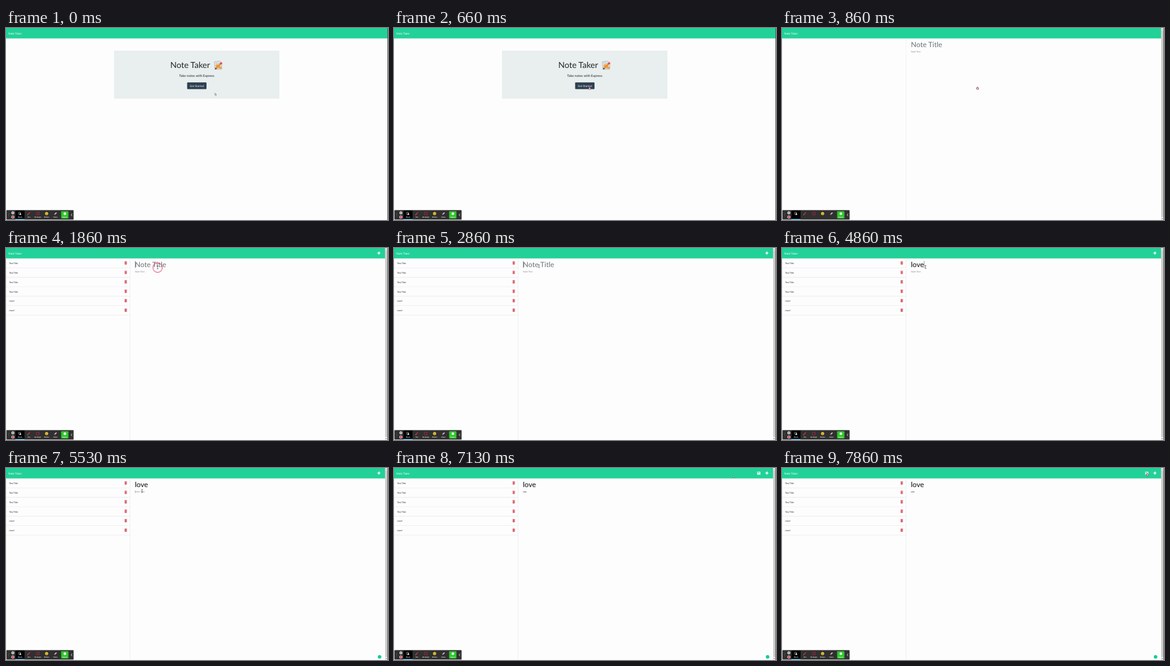
An HTML page with a canvas for the animation above (8 s loop, 640x322 px).

```html
<!DOCTYPE html>
<html lang="en">
<head>
<meta charset="utf-8">
<title>Note Taker</title>
<style>
html, body { margin: 0; width: 100%; height: 100%; overflow: hidden; background: #fdfdfe; }
canvas { display: block; width: 640px; height: 322px; }
</style>
</head>
<body>
<canvas id="stage" width="640" height="322"></canvas>
<script>
const ctx = document.getElementById('stage').getContext('2d');
const LOOP = 8000;
const STEP = 1000 / 15;
const GREEN = '#22d198';
const INK = '#212529';

// Pointer moves: start, end, from x/y, to x/y, easing
const inOut = p => p * p * (3 - 2 * p);
const out = p => 1 - Math.pow(1 - p, 3.5);
const MOVES = [
  [0, 660, 350, 109, 327, 99, inOut],
  [870, 1660, 327, 99, 254, 32.5, inOut],
  [1870, 2530, 254, 32.5, 243, 30.5, inOut],
  [4730, 5260, 243, 30.5, 228, 38.5, inOut],
  [6733, 7600, 228, 38.5, 611.5, 9, out]
];

function pointerAt(t) {
  let pos = [350, 109];
  for (const [start, end, x0, y0, x1, y1, ease] of MOVES) {
    if (t < start) break;
    const p = ease(Math.min(1, (t - start) / (end - start)));
    pos = [x0 + (x1 - x0) * p, y0 + (y1 - y0) * p];
  }
  return pos;
}

function box(x, y, w, h, fill, r = 0) {
  ctx.fillStyle = fill;
  ctx.beginPath();
  ctx.roundRect(x, y, w, h, r);
  ctx.fill();
}

function dot(x, y, r, fill) {
  ctx.fillStyle = fill;
  ctx.beginPath();
  ctx.arc(x, y, r, 0, Math.PI * 2);
  ctx.fill();
}

function ring(x, y, r, color, width) {
  ctx.strokeStyle = color;
  ctx.lineWidth = width;
  ctx.beginPath();
  ctx.arc(x, y, r, 0, Math.PI * 2);
  ctx.stroke();
}

function path(points, fill, stroke, width = 1, close = true) {
  ctx.beginPath();
  points.forEach(([x, y], i) => i ? ctx.lineTo(x, y) : ctx.moveTo(x, y));
  if (close) ctx.closePath();
  if (fill) { ctx.fillStyle = fill; ctx.fill(); }
  if (stroke) { ctx.strokeStyle = stroke; ctx.lineWidth = width; ctx.stroke(); }
}

const line = (points, color, width) => path(points, null, color, width, false);

function label(str, x, y, size, color, align = 'left', weight = 400) {
  ctx.font = `${weight} ${size}px Lato, "Open Sans", sans-serif`;
  ctx.textRendering = 'geometricPrecision';
  ctx.textAlign = align;
  ctx.fillStyle = color;
  ctx.fillText(str, x, y);
  return ctx.measureText(str).width;
}

function header(width) {
  box(0, 0, width, 17.6, GREEN);
  label('Note Taker', 4, 10.6, 4.69, '#fff');
}

function memo() {
  path([[349, 56.5], [358.5, 55.5], [362, 59], [361.5, 69], [350, 69.5]], '#dfe3e4', '#8d9497', 0.5);
  for (let y = 59; y < 68; y += 2.2) line([[351, y], [359.5, y - 0.3]], '#a9b1b5', 0.5);
  path([[350.5, 63.5], [353.5, 60.8], [362, 66.2], [359.8, 69.2]], '#f4a13a');
  line([[352, 67.5], [360, 59.6]], '#f28a2e', 2.8);
  line([[359, 60.6], [361.6, 58]], '#e0455c', 2.8);
  path([[350, 69.5], [350.8, 66.2], [353.3, 68.7]], '#5b4636');
}

function landing() {
  header(639);
  box(181, 38, 277, 80.5, '#e8efee');
  label('Note Taker', 275.2, 67.2, 14, INK);
  memo();
  label('Take notes with Express', 319.5, 81.8, 5.63, INK, 'center');
  box(303.5, 91.2, 32.4, 11.4, '#2c3e50', 1);
  label('Get Started', 319.7, 98.6, 4.69, '#fff', 'center');
}

function trash(x, y) {
  box(x - 2.1, y - 2.6, 4.2, 0.9, '#d8505c');
  box(x - 0.8, y - 3, 1.6, 0.5, '#d8505c');
  box(x - 1.8, y - 1.5, 3.6, 4.1, '#d8505c', 0.5);
  for (const dx of [-0.9, 0, 0.9]) line([[x + dx, y - 0.8], [x + dx, y + 1.9]], '#efa9af', 0.3);
}

function saveIcon(x, y) {
  path([[x - 2.6, y - 2.6], [x + 1.5, y - 2.6], [x + 2.6, y - 1.5], [x + 2.6, y + 2.6], [x - 2.6, y + 2.6]], '#fff');
  box(x - 1.8, y - 1.9, 3, 1.4, GREEN);
  dot(x, y + 1.1, 0.8, GREEN);
}

function scrollbar() {
  box(635, 0, 4.2, 322, '#ececec');
  box(635.7, 4, 2.8, 313, '#c4c4c4');
  path([[637, 1.2], [638.2, 2.6], [635.8, 2.6]], '#666');
  path([[637, 320.6], [638.2, 319.2], [635.8, 319.2]], '#444');
}

const typed = (str, times, t) => str.slice(0, times.filter(at => t >= at).length);
const within = (t, spans) => spans.some(([a, b]) => t >= a && t < b);

function notes(t) {
  const loaded = t >= 925;
  header(635);
  box(207.5, 17.6, 0.8, 304.4, loaded ? '#e9ebec' : '#f3f0e2');
  box(0, 17.6, 0.5, 304.4, '#ececec');
  scrollbar();

  if (loaded) {
    ['Test Title', 'Test Title', 'Test Title', 'Test Title', 'cswd', 'cswd'].forEach((name, i) => {
      const y = 25.4 + i * 15.85;
      label(name, 5.2, y + 1.6, 3.75, INK);
      trash(200.6, y - 0.3);
      box(0, y + 7.6, 207.5, 0.6, '#e2e4e5');
    });
    box(622, 7.8, 5.4, 1.4, '#fff', 0.4);
    box(624, 5.8, 1.4, 5.4, '#fff', 0.4);
  }

  const title = typed('love', [3595, 3660, 3730, 3795], t);
  const titleWidth = label(title || 'Note Title', 216, 31.7, 12, title ? '#0b0b0b' : '#6f7477');
  if (within(t, [[1855, 2360], [2855, 3395], [3595, 4395], [4860, 5395]]))
    box(216 + (title ? titleWidth : 0), 21.8, 0.5, 11.6, '#333');

  const body = typed('you', [6055, 6195, 6325], t);
  const bodyWidth = label(body || 'Note Text', 216, 41.4, 3.75, body ? INK : '#83888b');
  if (within(t, [[5395, 5995], [6055, 6795], [7325, 7855]]))
    box(216 + (body ? bodyWidth : 0), 38, 0.3, 4.4, '#555');

  if (body) saveIcon(611.2, 8.6);
  if (t >= 5395) dot(625.9, 316.8, 3, '#17cc9b');
}

function toolbar(labels) {
  box(0.5, 305.2, 113, 16.3, '#8b8b8b', 1.2);
  box(1, 305.8, 112, 15.2, '#303030', 1);
  for (let i = 0; i < 3; i++) dot(4.4, 311 + i * 2, 0.4, '#999');

  dot(11.5, 310, 2.5, '#d9d9d9');
  line([[10.5, 309], [12.5, 311]], '#333', 0.6);
  line([[12.5, 309], [10.5, 311]], '#333', 0.6);
  dot(11.5, 317, 2.5, '#e7e2e2');
  dot(11.5, 317, 1.7, '#d9304f');

  box(16, 306, 15, 14.6, '#000');
  box(16, 320, 15, 0.9, '#2d9fd8');
  ring(22.8, 310.8, 2, '#ddd', 0.6);
  path([[23, 310], [26, 313], [24.4, 313.1], [23.4, 314.6]], '#fff');

  line([[36.5, 313], [40, 309.2]], '#c92a44', 1.5);
  line([[36, 313.7], [36.8, 312.7]], '#eee', 0.7);
  ctx.strokeStyle = '#b8243c';
  ctx.lineWidth = 0.8;
  ctx.strokeRect(51, 309, 4.6, 4.2);
  dot(68, 311.2, 2.6, '#f5c431');
  dot(67.1, 310.6, 0.4, '#333');
  dot(68.9, 310.6, 0.4, '#333');
  line([[66.8, 312.1], [68, 312.7], [69.2, 312.1]], '#333', 0.4);
  line([[81.4, 312.6], [84.6, 309.6]], '#c9c9c9', 1.8);
  line([[81, 313], [82.2, 311.9]], '#d85a6c', 1.8);

  if (labels) {
    ['Mouse', 'Pen', 'Rectangle', 'Stickers', 'Eraser'].forEach((name, i) =>
      label(name, 23.6 + i * 14.85, 317.7, 2.5, '#fff', 'center', 700));
  }

  box(92.4, 307.2, 12.2, 12.2, '#2fc72c', 1);
  dot(98.6, 311.4, 2.2, '#fff');
  label('Capture', 98.5, 317.8, 2.3, '#fff', 'center', 700);
  line([[110.7, 311.4], [109.2, 313.4], [110.7, 315.4]], '#fff', 0.8);
}

function arrow(x, y) {
  path([[x, y], [x, y + 3.6], [x + 0.9, y + 2.9], [x + 1.6, y + 4.3], [x + 2.2, y + 4], [x + 1.6, y + 2.7], [x + 2.6, y + 2.5]],
    '#fff', '#444', 0.5);
}

function hand(x, y) {
  path([[x, y], [x + 0.8, y], [x + 0.9, y + 1.5], [x + 2.5, y + 2], [x + 2.3, y + 4], [x - 0.3, y + 4], [x - 1.4, y + 2.3], [x, y + 2.4]],
    '#fff', '#444', 0.5);
}

function beam(x, y) {
  line([[x, y - 2.2], [x, y + 2.2]], '#333', 0.6);
  for (const dy of [-2.4, 2.4]) line([[x - 1.4, y + dy], [x + 1.4, y + dy]], '#333', 0.6);
}

function pointer(t) {
  const [x, y] = pointerAt(t);
  const overButton = t < 925 && x < 336 && y < 103;
  const overSave = t > 7000 && x > 608;
  if (overButton || overSave) hand(x, y);
  else if (t >= 925 && y > 18) beam(x, y);
  else arrow(x, y);

  const pressed = within(t, [[655, 925], [1655, 1855], [5195, 5395], [7855, LOOP]]);
  if (pressed) ring(x + 0.5, y + 2, 1.9, 'rgba(196, 60, 130, .75)', 0.8);

  // Ring spreads and fades after release
  const p = (t - 1860) / 330;
  if (p >= 0 && p < 1) ring(254, 33, 7.8 + 2.5 * p, `rgba(219, 62, 104, ${0.85 * (1 - p)})`, 1.1);
}

function draw(now) {
  const t = Math.floor((now % LOOP + 7) / STEP) * STEP;
  box(0, 0, 640, 322, '#fdfdfe');
  if (t < 855) landing();
  else notes(t);
  box(639.2, 0, 0.8, 322, '#333');
  toolbar(t < 855 || t >= 925);
  pointer(t);
  requestAnimationFrame(draw);
}

requestAnimationFrame(draw);
</script>
</body>
</html>
```
